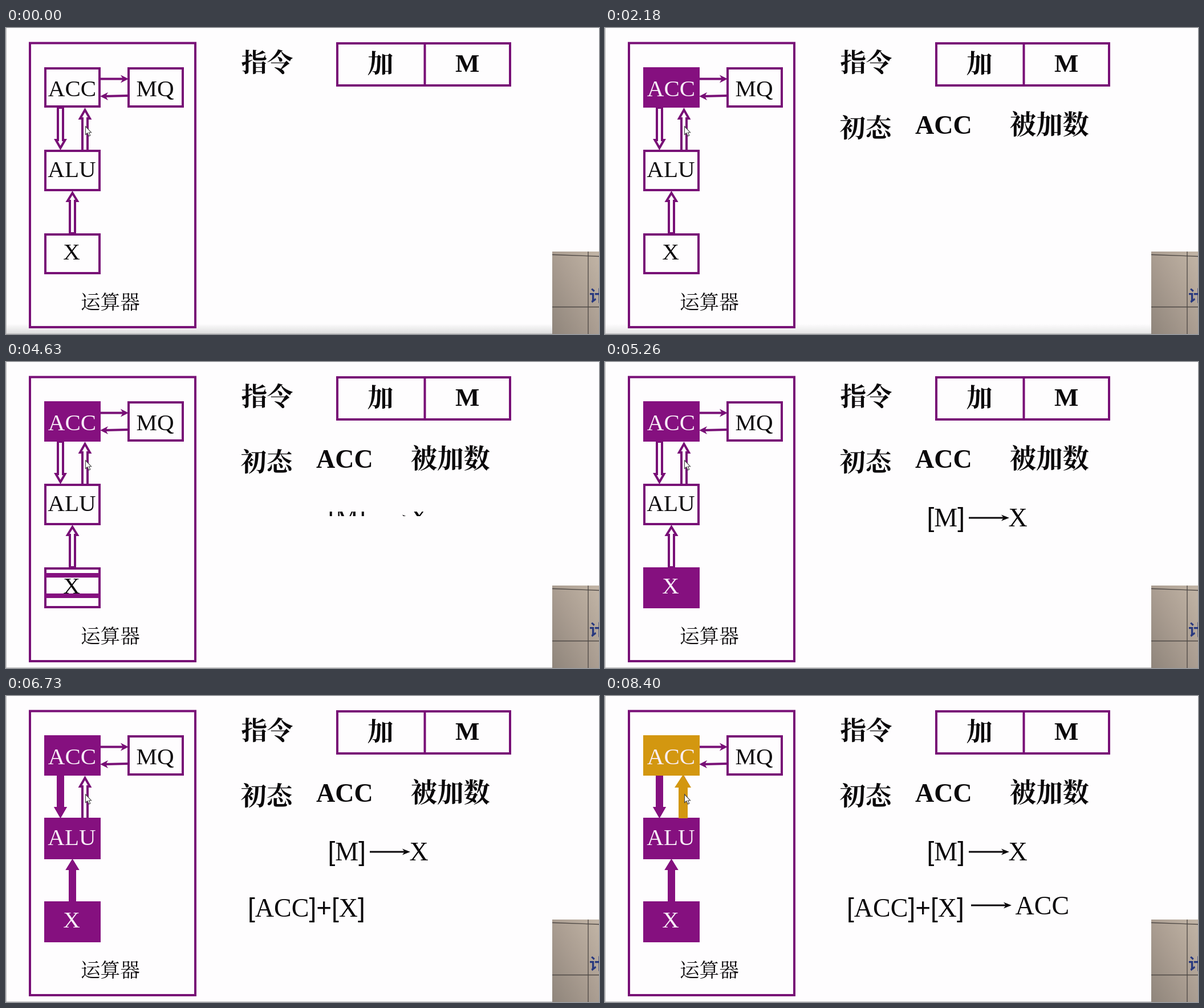
Write an HTML page that moves like this. It is 1040x538 px and loops after 8470 ms.

```html
<!DOCTYPE html>
<html lang="zh-CN">
<head>
<meta charset="utf-8">
<title>加法指令</title>
<style>
@property --open { syntax: "<length>"; inherits: false; initial-value: 0px; }

html, body { margin: 0; width: 100%; height: 100%; overflow: hidden; background: #fefdfe; }
svg { position: absolute; left: 0; top: 0; width: 1040px; height: 538px; overflow: hidden; }

text { font-family: "Liberation Serif", "Noto Serif CJK SC", "Noto Sans CJK SC", serif; fill: #0b090b; white-space: pre; }
.reg { font-size: 41px; text-anchor: middle; }
.cjk { font-size: 45.5px; font-weight: 700; }
.eq { font-size: 46px; }
.eq tspan { font-family: "Liberation Sans", sans-serif; }
.ink { fill: none; stroke: #0b090b; stroke-width: 2.8; }
.tip { fill: #0b090b; }

.line { fill: none; stroke: #780f76; stroke-width: 4; }
.hollow { fill: #fefdfe; stroke: #780f76; stroke-width: 4; }
.full { fill: #85107f; stroke: #85107f; stroke-width: 4; }
.gold { fill: #d39710; stroke: #d39710; stroke-width: 4; }
.full + text, .gold + text { fill: #f8eef8; }

/* horizontal blinds, 36px slats */
.blinds {
  -webkit-mask: repeating-linear-gradient(#000 0 var(--open), transparent var(--open) 36px) 0 -25px / 100% 576px;
  mask: repeating-linear-gradient(#000 0 var(--open), transparent var(--open) 36px) 0 -25px / 100% 576px;
  animation: 8470ms linear infinite;
}
.start { animation-name: start; }
.load { animation-name: load; }
.add { animation-name: add; }
.store { animation-name: store; }
@keyframes start { 0%, 5.4% { --open: 0px } 11.2%, 100% { --open: 36px } }
@keyframes load { 0%, 53.4% { --open: 0px } 59.3%, 100% { --open: 36px } }
@keyframes add { 0%, 73% { --open: 0px } 78.9%, 100% { --open: 36px } }
@keyframes store { 0%, 91.8% { --open: 0px } 97.7%, 100% { --open: 36px } }

.shade { animation: shade 8470ms linear infinite; }
@keyframes shade { 0%, 25% { opacity: 1 } 28%, 100% { opacity: 0 } }
</style>
</head>
<body>

<svg viewBox="0 0 1040 538">
  <defs>
    <rect id="acc" x="69" y="71" width="95" height="67"/>
    <rect id="alu" x="69" y="216" width="95" height="69"/>
    <rect id="x" x="69" y="363" width="95" height="68"/>
    <path id="down" d="M91 140V197H87.5L95.5 211L103.5 197H100V140Z"/>
    <path id="up" d="M134 216V159H130L138.5 144L147 159H143V216Z"/>
    <path id="feed" d="M112 361V304H108L116.5 290L125 304H121V361Z"/>
    <g id="arrow">
      <path class="ink" d="M0 0H64"/>
      <path class="tip" d="M71 0L57 -5.5L61 0L57 5.5Z"/>
    </g>
    <linearGradient id="fade" x2="0" y2="1">
      <stop stop-color="#ddd" stop-opacity="0"/>
      <stop offset="1" stop-color="#dadada"/>
    </linearGradient>
    <linearGradient id="wall" x1="0" y1="1" x2="1" y2="0">
      <stop stop-color="#8f857b"/>
      <stop offset=".5" stop-color="#aa9d91"/>
      <stop offset="1" stop-color="#c2b5a6"/>
    </linearGradient>
  </defs>

  <rect class="shade" y="520" width="1040" height="18" fill="url(#fade)"/>
  <path d="M.5 0V538M0 537.5H1040" stroke="#bdbcbd" fill="none"/>

  <rect class="line" x="42" y="26.5" width="290" height="499.5"/>
  <use href="#down" class="hollow"/>
  <use href="#up" class="hollow"/>
  <use href="#feed" class="hollow"/>
  <use href="#acc" class="hollow"/><text class="reg" x="116" y="120">ACC</text>
  <rect class="line" x="215" y="71" width="95" height="67"/><text class="reg" x="261.5" y="120">MQ</text>
  <use href="#alu" class="hollow"/><text class="reg" x="115.5" y="262">ALU</text>
  <use href="#x" class="hollow"/><text class="reg" x="115" y="407">X</text>
  <path class="line" d="M166 89.5H208M213 119L172 120"/>
  <path fill="#780f76" d="M215 89.5L201 82.5L205 89.5L201 96.5ZM165 120L179 113L175 120L179 127Z"/>
  <text x="131" y="494" font-size="34.6">运算器</text>

  <text class="cjk" x="412.5" y="77">指令</text>
  <path class="line" d="M581 27H884V101H581ZM734.5 27V101"/>
  <text class="cjk" x="634" y="79">加</text>
  <text x="788" y="77" font-size="45" font-weight="700">M</text>
</svg>

<svg class="blinds start" viewBox="0 0 1040 538">
  <use href="#acc" class="full"/><text class="reg" x="116" y="120">ACC</text>
  <text class="cjk" x="411.5" y="192">初态</text>
  <text x="544" y="186" font-size="46" font-weight="700">ACC</text>
  <text class="cjk" x="710" y="186" style="font-size:46.3px">被加数</text>
</svg>

<svg class="blinds load" viewBox="0 0 1040 538">
  <use href="#x" class="full"/><text class="reg" x="115" y="407">X</text>
  <text class="eq" x="564.5" y="289"><tspan>[</tspan>M<tspan>]</tspan></text>
  <use href="#arrow" x="638" y="274"/>
  <text class="eq" x="707.5" y="289">X</text>
</svg>

<svg class="blinds add" viewBox="0 0 1040 538">
  <use href="#down" class="full"/>
  <use href="#feed" class="full"/>
  <use href="#alu" class="full"/><text class="reg" x="115.5" y="262">ALU</text>
  <text class="eq" x="424" y="388"><tspan>[</tspan>ACC<tspan>]+[</tspan>X<tspan>]</tspan></text>
</svg>

<svg class="blinds store" viewBox="0 0 1040 538">
  <path fill="#d39710" d="M129 215V161H122L137 138L151 161H145V215Z"/>
  <use href="#acc" class="gold"/><text class="reg" x="116" y="120">ACC</text>
  <use href="#arrow" x="642" y="368"/>
  <text class="eq" x="719.5" y="384">ACC</text>
</svg>

<svg viewBox="0 0 1040 538">
  <path d="M139.500 173V187.500L142.800 184.500L145.300 190L147.800 189L145.400 183.700H149.500Z" fill="#fff" stroke="#444" stroke-width="1.100"/>
  <rect x="958" y="393" width="82" height="145" fill="url(#wall)"/>
  <path d="M958 398.500L1040 401.500M958 490.500H1040M1021 393V538" stroke="#4d4744" stroke-width="1.300" fill="none"/>
  <text x="1023" y="481" font-size="27" font-weight="700" style="fill:#27387f;font-family:'Noto Sans CJK SC',sans-serif">计</text>
</svg>

</body>
</html>
```
